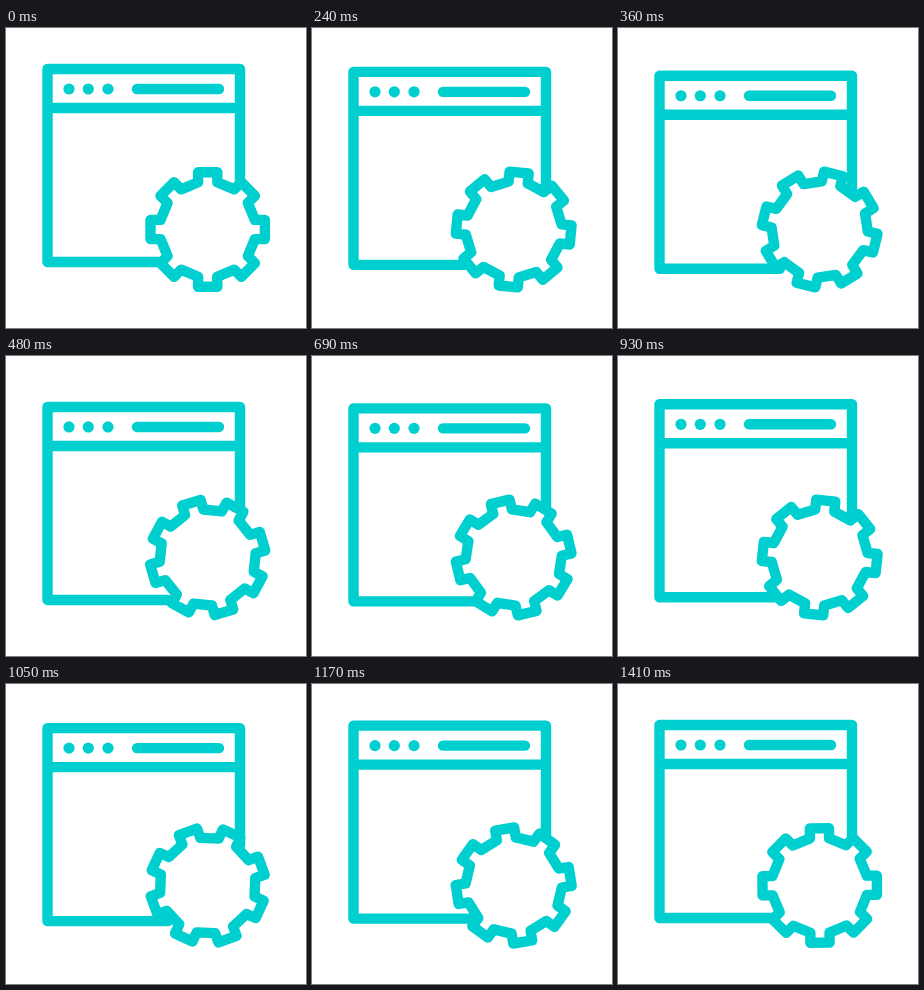
These frames come from a looping animation (300 px wide and 300 px high, 1500 ms). An HTML page:

```html
<!DOCTYPE html>
<html lang="en">
<head>
<meta charset="utf-8">
<title>Browser settings</title>
<style>
html, body { margin: 0; width: 100%; height: 100%; overflow: hidden; background: #fff; }
svg { display: block; width: 100vw; height: 100vh; }
.line { fill: none; stroke: #00cfcf; stroke-width: 10.4; stroke-linecap: round; stroke-linejoin: round; }
.dot { fill: #00cfcf; }
</style>
</head>
<body>
<svg viewBox="0 0 300 300">
  <g id="win">
    <path class="line" d="M162 234H41.5V41H234V158M41.5 80H234M131 61H213"/>
    <circle class="dot" cx="63" cy="61" r="5.6"/>
    <circle class="dot" cx="82.3" cy="61" r="5.6"/>
    <circle class="dot" cx="102" cy="61" r="5.6"/>
  </g>
  <path id="gear" class="line" style="fill:#fff"/>
</svg>
<script>
const LOOP = 1500, STEP = 30;
const SPIN = 1470, LOW = 660, BACK = 1290, DROP = 11.4;
const CX = 201.7, CY = 201.5, TEETH = 8;
const win = document.getElementById('win');
const gear = document.getElementById('gear');

// Symmetric cubic-bezier(k, 0, 1 - k, 1), solved by bisection
function ease(x, k) {
  x = Math.min(1, Math.max(0, x));
  let lo = 0, hi = 1;
  for (let i = 0; i < 24; i++) {
    const s = (lo + hi) / 2, r = 1 - s;
    const at = 3 * s * r * r * k + 3 * s * s * r * (1 - k) + s * s * s;
    if (at < x) lo = s; else hi = s;
  }
  return lo * lo * (3 - 2 * lo);
}

function gearPath() {
  const tooth = [[-9.6, -47.2], [-9.6, -57.2], [9.6, -57.2], [9.6, -47.2]];
  const pts = [];
  for (let i = 0; i < TEETH; i++) {
    const a = i * 2 * Math.PI / TEETH, c = Math.cos(a), s = Math.sin(a);
    for (const [x, y] of tooth) {
      pts.push((x * c - y * s).toFixed(2) + ' ' + (x * s + y * c).toFixed(2));
    }
  }
  return 'M' + pts.join('L') + 'Z';
}

function draw(ms) {
  const t = Math.floor((ms % LOOP) / STEP) * STEP;
  const angle = 180 * ease(t / SPIN, 0.6);
  const drop = t < LOW
    ? ease(t / LOW, 0.5)
    : 1 - ease((t - LOW) / (BACK - LOW), 0.5);
  win.setAttribute('transform', `translate(0 ${(DROP * drop).toFixed(2)})`);
  gear.setAttribute('transform', `translate(${CX} ${CY}) rotate(${angle.toFixed(2)})`);
}

gear.setAttribute('d', gearPath());
const start = performance.now();
function tick() {
  draw(performance.now() - start);
  requestAnimationFrame(tick);
}
tick();
</script>
</body>
</html>
```
